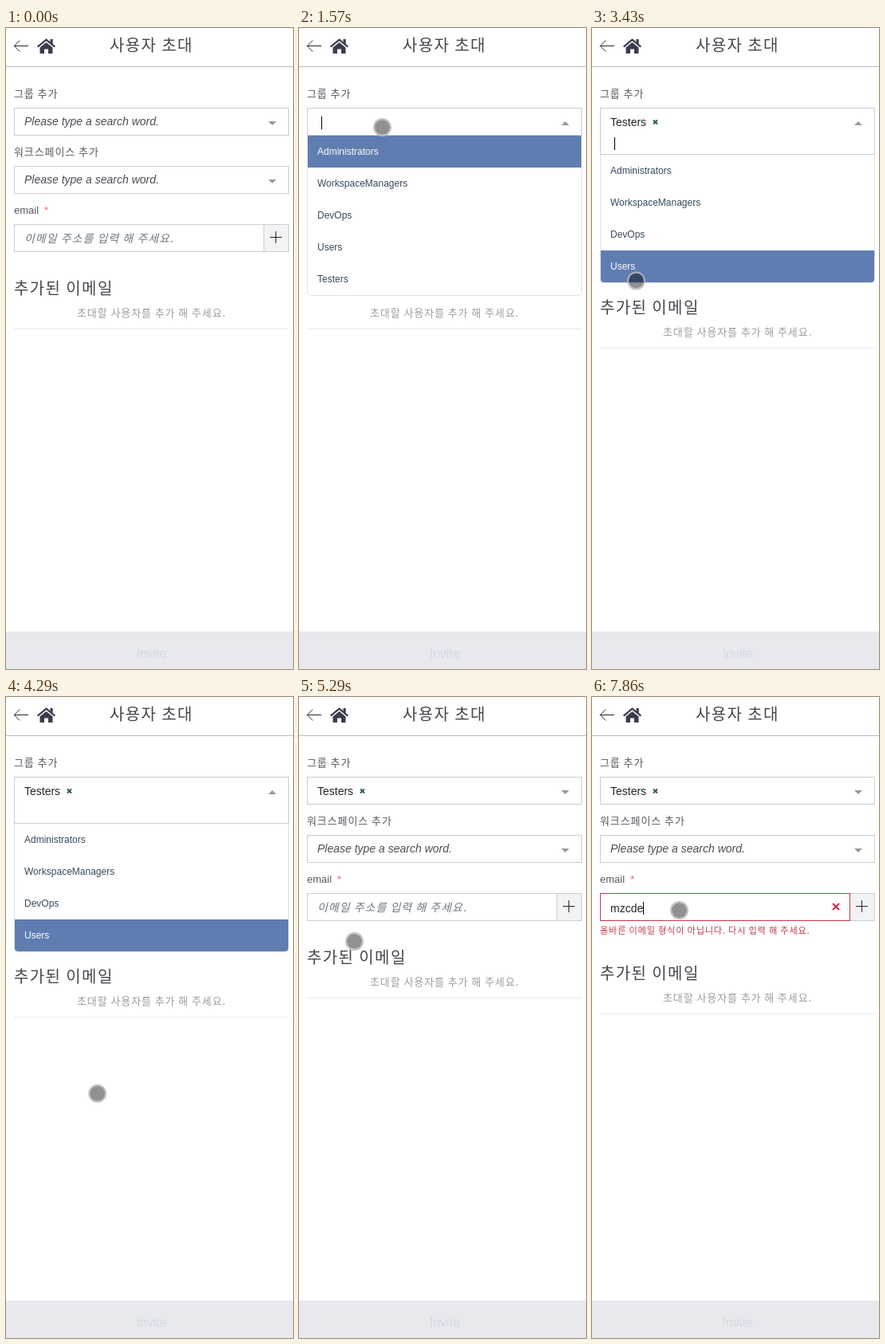
These frames come from a looping animation (360 px wide and 804 px high, 8000 ms). An HTML page with a canvas:

```html
<!DOCTYPE html>
<html lang="ko">
<head>
<meta charset="utf-8">
<title>사용자 초대</title>
<style>
html, body { margin: 0; width: 100%; height: 100%; overflow: hidden; background: #fff; }
canvas { display: block; width: 360px; height: 804px; }
</style>
</head>
<body>
<canvas id="stage"></canvas>
<script>
const W = 360, H = 804, LOOP = 8000, STEP = 1000 / 7;
const LATIN = '"Liberation Sans", Arial, sans-serif';
const HANGUL = '"Noto Sans CJK KR", "Noto Sans CJK", "Noto Sans CJK JP", sans-serif';
const INK = '#23282c', SOFT = '#42474d', LABEL = '#555a61';
const EDGE = '#c9cdd3', RED = '#c5384a', BLUE = '#5f7db1';
const GROUPS = ['Administrators', 'WorkspaceManagers', 'DevOps', 'Users', 'Testers'];

// When things happen, in ms
const T = { show: 570, open: 1430, pick: 3430, blur: 4710, close: 5000, focus: 5860 };
const KEYS = [6570, 7140, 7570, 7710, 7860];
const WORD = 'mzcde';

// Pointer path: time, x, y
const PATH = [
  [570, 132.5, 343.5], [710, 132.5, 231.5], [860, 132.5, 231.5],
  [1290, 105, 121], [1430, 104.5, 124.5], [1860, 104.5, 124.5],
  [3000, 43.5, 313.5], [3140, 55.5, 317], [3430, 55.5, 317],
  [4430, 118, 507.5], [4570, 120.5, 511.5], [4860, 120.5, 511.5],
  [5290, 69.5, 306.5], [5570, 72, 291], [5860, 109.5, 267.5], [8000, 109.5, 267.5]
];

const canvas = document.getElementById('stage');
const c = canvas.getContext('2d');
const dpr = window.devicePixelRatio || 1;
canvas.width = W * dpr;
canvas.height = H * dpr;

function text(s, x, y, size, color, family = LATIN, style = '') {
  c.font = `${style} ${size}px ${family}`;
  c.fillStyle = color;
  c.fillText(s, x, y);
}

function hangul(s, x, y, size, color, style = '300') {
  c.letterSpacing = `${size * 0.07}px`;
  text(s, x, y, size, color, HANGUL, style);
  c.letterSpacing = '0px';
}

function rect(x, y, w, h, color) {
  c.fillStyle = color;
  c.fillRect(x, y, w, h);
}

function box(x, y, w, h, edge, fill = '#fff') {
  rect(x, y, w, h, edge);
  rect(x + 1, y + 1, w - 2, h - 2, fill);
}

function line(points, width, color) {
  c.beginPath();
  points.forEach(([x, y]) => c.lineTo(x, y));
  c.lineWidth = width;
  c.strokeStyle = color;
  c.stroke();
}

function shape(points, color) {
  c.beginPath();
  points.forEach(([x, y]) => c.lineTo(x, y));
  c.fillStyle = color;
  c.fill();
}

function cross(x, y, r, width, color) {
  line([[x - r, y - r], [x + r, y + r]], width, color);
  line([[x + r, y - r], [x - r, y + r]], width, color);
}

function caretOn(t, since) {
  return Math.floor((t - since) / 500) % 2 === 0;
}

function pointerAt(t) {
  if (t < T.show) return null;
  const i = Math.max(1, PATH.findIndex(p => p[0] >= t));
  const [t0, x0, y0] = PATH[i - 1], [t1, x1, y1] = PATH[i];
  const u = (t - t0) / (t1 - t0), e = u * u * (3 - 2 * u);
  return [x0 + (x1 - x0) * e, y0 + (y1 - y0) * e];
}

function header() {
  line([[28, 22.5], [10.5, 22.5]], 1, INK);
  line([[17.2, 15.5], [10.2, 22.5], [17.2, 29.5]], 1, INK);
  const dark = '#3a3c4e';
  line([[39.7, 23.6], [50.5, 14.7], [61.3, 23.6]], 2.3, dark);
  rect(55.5, 14, 3.2, 6, dark);
  shape([[50.5, 18], [58.5, 24.6], [58.5, 32], [53, 32], [53, 26.5], [48, 26.5],
    [48, 32], [42.5, 32], [42.5, 24.6]], dark);
  hangul('사용자 초대', 130, 29, 20, SOFT);
  rect(0, 48, W, 1, '#b9bbbf');
}

function arrow(y, up) {
  const a = up ? y + 5 : y, b = up ? y : y + 5;
  shape([[329, a], [339, a], [334, b]], '#999');
}

function hint(y) {
  text('Please type a search word.', 23, y, 14, '#4a4e54', LATIN, 'italic');
}

function groupField(t, open, picked, tall) {
  hangul('그룹 추가', 10, 87, 13, LABEL);
  box(10, 100, 345, tall ? 59 : 35, EDGE);
  arrow(117, open);
  if (picked) {
    text('Testers', 23, 123, 14, INK);
    cross(79.5, 118, 2.5, 1.9, '#2c5f4c');
  } else if (!open) hint(122);
  const since = picked ? T.pick : T.open;
  if (open && t < T.blur && caretOn(t, since)) rect(28, picked ? 137 : 111, 1, 16, '#000');
}

function menu(top, items, active) {
  const h = items.length * 40;
  c.save();
  c.beginPath();
  c.roundRect(10, top, 345, h + 1, [0, 0, 5, 5]);
  c.fillStyle = '#dfe1e4';
  c.fill();
  c.beginPath();
  c.roundRect(11, top, 343, h, [0, 0, 4, 4]);
  c.clip();
  rect(11, top, 343, h, '#fff');
  items.forEach((name, i) => {
    const y = top + i * 40;
    if (i === active) rect(11, y, 343, 40, BLUE);
    text(name, 23, y + 24, 12, i === active ? '#fff' : '#35495e');
  });
  c.restore();
}

function emailField(t, shift) {
  const typed = WORD.slice(0, KEYS.filter(k => t >= k).length);
  const focus = t >= T.focus, bad = typed.length > 0;
  text('email', 10, 233 + shift, 13, LABEL);
  text('*', 48, 233 + shift, 13, '#f0626c');
  box(323, 246 + shift, 32, 35, EDGE, '#f2f3f4');
  rect(331, 262 + shift, 15, 1, INK);
  rect(338, 255 + shift, 1, 15, INK);
  box(10, 246 + shift, 314, 35, bad ? RED : focus ? '#aab9d4' : EDGE);
  if (bad) {
    text(typed, 23, 270, 14, INK);
    cross(306, 263, 4, 2.3, RED);
    hangul('올바른 이메일 형식이 아닙니다. 다시 입력 해 주세요.', 10, 297, 11.2, RED);
  } else {
    hangul('이메일 주소를 입력 해 주세요.', 23, 269 + shift, 14, '#6b7580', 'italic 300');
  }
  if (focus) {
    // The caret restarts its blink at each key press
    const since = bad ? KEYS[typed.length - 1] : T.focus - 70;
    c.font = `14px ${LATIN}`;
    const x = Math.round(23 + c.measureText(typed).width);
    if (caretOn(t, since)) rect(x, 257, 1, 16, '#000');
  }
  return bad;
}

function draw(t) {
  const open = t >= T.open && t < T.close;
  const picked = t >= T.pick;
  const tall = picked && t < T.blur;
  const shift = tall ? 24 : 0;

  c.setTransform(dpr, 0, 0, dpr, 0, 0);
  rect(0, 0, W, H, '#fff');
  header();

  hangul('워크스페이스 추가', 10, 160 + shift, 13, LABEL);
  box(10, 173 + shift, 345, 35, EDGE);
  hint(195 + shift);
  arrow(190 + shift, false);

  const drop = shift + (emailField(t, shift) ? 20 : 0);
  hangul('추가된 이메일', 10, 334 + drop, 20, SOFT);
  hangul('초대할 사용자를 추가 해 주세요.', 89, 362 + drop, 13, '#999da2');
  rect(10, 377 + drop, 345, 1, '#e6e8eb');

  groupField(t, open, picked, tall);
  const pointer = pointerAt(t);
  if (open) {
    const row = Math.floor((pointer[1] - 135) / 40);
    menu(tall ? 159 : 135, picked ? GROUPS.slice(0, 4) : GROUPS,
      picked ? 3 : Math.min(4, Math.max(0, row)));
  }

  rect(0, 757, W, 47, '#e7e9ee');
  text('Invite', 163.5, 790, 16, '#d6d9df');

  if (pointer) {
    const [x, y] = pointer;
    c.beginPath();
    c.arc(x, y, 9.6, 0, 7);
    c.fillStyle = 'rgba(0,0,0,.43)';
    c.fill();
    c.beginPath();
    c.arc(x, y, 10.5, 0, 7);
    c.lineWidth = 2;
    c.strokeStyle = 'rgba(185,185,185,.85)';
    c.stroke();
  }
}

const start = performance.now();
function tick(now) {
  const t = Math.max(0, now - start) % LOOP;
  // The screen refreshes seven times a second, on whole hundredths
  const n = Math.floor((t + 5) / STEP);
  draw(Math.min(LOOP, Math.round(n * STEP / 10) * 10));
  requestAnimationFrame(tick);
}
draw(0);
requestAnimationFrame(tick);
</script>
</body>
</html>
```
